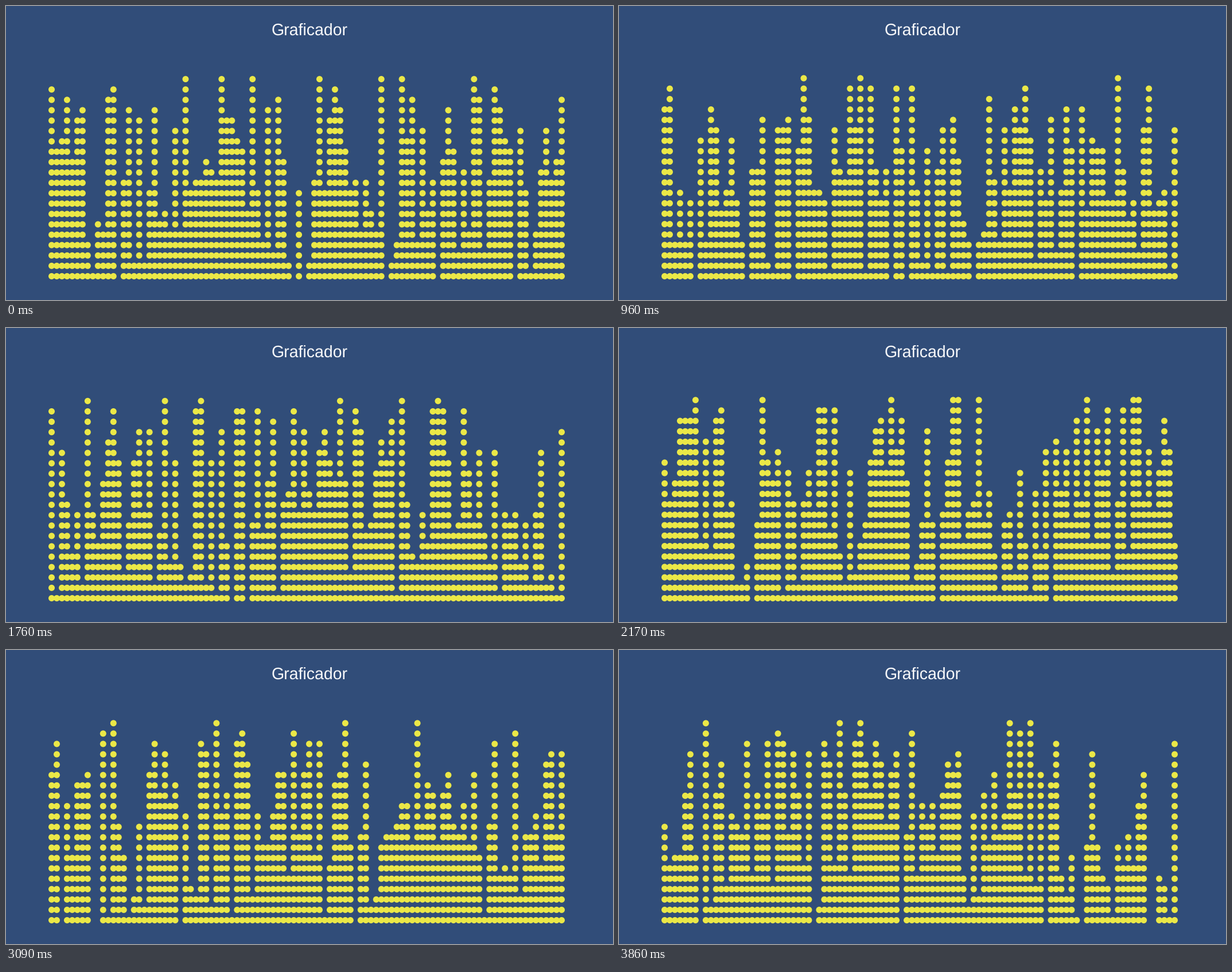
Write a matplotlib script that moves like this. It is 1058 by 513 pixels and loops after 4020 ms.

```python
import matplotlib.pyplot as plt
import numpy as np
from matplotlib.animation import FuncAnimation

plt.rcParams["text.hinting"] = "none"

W, H, DPI = 1058, 513, 64
PT = 72 / DPI  # points per pixel
LOOP_MS, STEP_MS = 4020, 10

BACK, DOT, TEXT = "#314d79", "#ebe847", "#f7f8fa"
COLUMNS, LEVELS, POSES = 100, 20, 31
LEFT, RIGHT, BASE = 79.5, 968.5, 471.5
DIAMETER = 11


def pose_starts():
    """Redraws slow down midway and land on a grid of screen refreshes."""
    pace = np.interp(np.arange(POSES), [0, 14, 27, 31], [0.7, 21.21, 45.91, 52.3])
    return np.maximum(0, 77.9 * np.floor(pace) - 38)


def bar_dots(rng):
    """Dot centres of one set of random bars; the row pitch varies a little."""
    heights = rng.integers(0, LEVELS + 1, COLUMNS)
    heights[rng.integers(COLUMNS)] = LEVELS
    column, row = np.nonzero(np.arange(LEVELS) < heights[:, None])
    x = np.linspace(LEFT, RIGHT, COLUMNS)[column]
    y = np.linspace(BASE, rng.uniform(124, 130), LEVELS)[row]
    return np.column_stack([x, y])


rng = np.random.default_rng(7)
poses = [bar_dots(rng) for _ in range(POSES)]
starts = pose_starts()

fig = plt.figure(figsize=(W / DPI, H / DPI), dpi=DPI, facecolor=BACK)
ax = fig.add_axes([0, 0, 1, 1])
ax.axis("off")
dots = ax.scatter(*poses[0].T, s=(DIAMETER * PT) ** 2, c=DOT, edgecolors="none")
ax.set(xlim=(0, W), ylim=(H, 0))
ax.text(W / 2, 50.8, "Graficador", family="Liberation Sans", size=28.5 * PT,
        color=TEXT, ha="center", va="baseline")


def update(frame):
    # Half a step of slack lets each pose appear on the nearest frame.
    now = (frame + 0.5) * STEP_MS
    dots.set_offsets(poses[np.searchsorted(starts, now, side="right") - 1])
    return [dots]


anim = FuncAnimation(fig, update, frames=LOOP_MS // STEP_MS, interval=STEP_MS,
                     repeat=True, repeat_delay=0)
plt.show()
```
